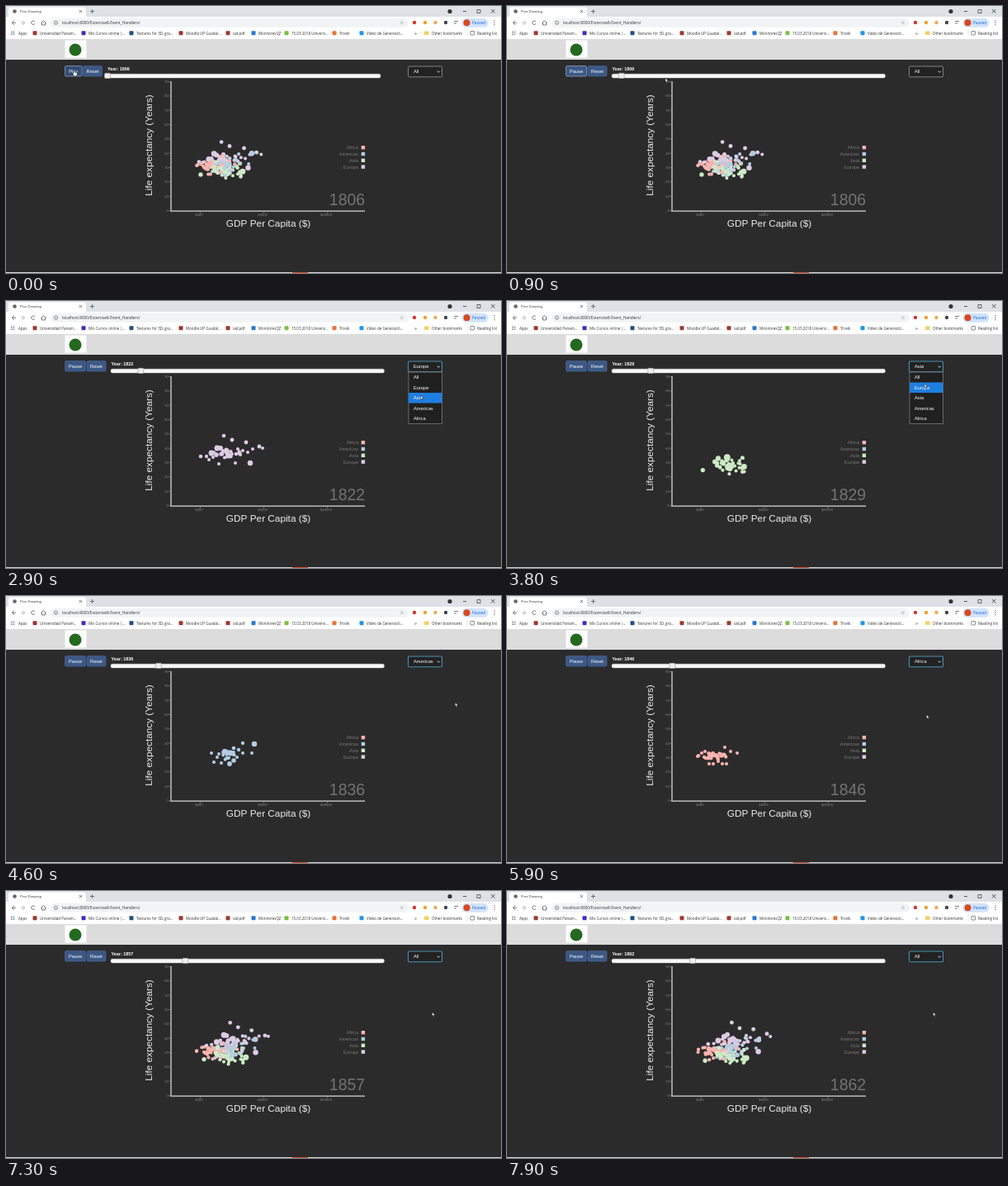
Write an HTML page with a canvas that moves like this. It is 600 by 323 pixels and loops after 8000 ms.

```html
<!DOCTYPE html>
<html lang="es">
<head>
<meta charset="utf-8">
<title>Pine Drawing</title>
<style>
html, body { margin: 0; width: 100%; height: 100%; overflow: hidden; background: #2b2b2b; }
canvas { display: block; width: 600px; height: 323px; }
</style>
</head>
<body>
<canvas id="stage"></canvas>
<script>
const LOOP = 8000, canvas = document.getElementById('stage'), c = canvas.getContext('2d');
const dpr = window.devicePixelRatio || 1;
canvas.width = 600 * dpr;
canvas.height = 323 * dpr;
c.scale(dpr, dpr);

const SANS = '"Liberation Sans", Arial, sans-serif', UI = '"Open Sans", sans-serif';
const COLORS = { Africa: '#fbb4ae', Americas: '#b3cde3', Asia: '#ccebc5', Europe: '#decbe4' };
const OPTIONS = ['All', 'Europe', 'Asia', 'Americas', 'Africa'];

// [time, year]
const YEARS = [[0, 1806.2], [900, 1806.2], [1800, 1812.5], [2900, 1822.5], [4600, 1836.5],
  [5900, 1846.5], [6700, 1853.5], [7900, 1862.4], [8000, 1862.9]];
// [time, x, y]
const POINTER = [[0, 82, 78], [700, 82, 78], [1500, 519.5, 114.5], [1800, 519.5, 114.5],
  [2050, 510, 80], [2200, 502, 104], [2350, 502, 104], [2650, 505, 80], [2850, 502.5, 114],
  [3050, 502.5, 115], [3400, 540, 125], [3700, 508, 80], [3950, 503, 130], [4100, 503, 130],
  [4450, 544.5, 129], [4600, 544.5, 129], [5000, 510, 80], [5200, 502, 142], [5350, 502, 142],
  [5700, 508.5, 143.5], [5950, 508.5, 143.5], [6150, 508, 80], [6300, 502, 92],
  [6420, 502, 92], [6650, 516.5, 146.5], [8000, 516.5, 146.5]];
// menu opens, menu closes, new choice
const CHOICES = [[2080, 2300, 'Europe'], [2680, 3000, 'Asia'], [3730, 4050, 'Americas'],
  [5020, 5320, 'Africa'], [6160, 6400, 'All']];

function track(keys, t) {
  let i = 0;
  while (i < keys.length - 2 && t >= keys[i + 1][0]) i++;
  const a = keys[i], b = keys[i + 1], k = (t - a[0]) / (b[0] - a[0]);
  return a.slice(1).map((v, j) => v + (b[j + 1] - v) * k);
}

function rand(n) {
  const s = Math.sin(n * 127.1 + 11.7) * 43758.5453;
  return s - Math.floor(s);
}

function wobble(id, year) {
  const n = Math.floor(year), k = year - n, at = m => rand(id * 91 + m) - 0.5;
  return at(n) * (1 - k) + at(n + 1) * k;
}

const spread = (n, range) => (rand(n) + rand(n + 500) + rand(n + 900) - 1.5) * range;

// Positions in a base year, with the drift per year
const GROUPS = {
  Europe: { base: 1822, dx: 0.2, dy: -0.07, at: [[236, 188], [243, 188], [246, 192], [249, 184],
    [251, 189], [252, 183], [255, 186], [256, 178], [258, 197], [260, 178], [262, 185], [264, 163],
    [267, 180], [270, 187], [274, 168], [274, 185], [278, 196], [279, 185], [281, 179], [284, 186],
    [287, 181], [291, 171], [293, 183], [296, 196], [299, 179], [307, 176], [311, 178]] },
  Americas: { base: 1836, dx: 0.12, dy: -0.02, at: [[249, 190], [252, 201], [256, 195], [258, 191],
    [261, 202], [263, 189], [266, 187], [268, 196], [271, 203], [272, 190], [276, 184], [276, 199],
    [280, 195], [282, 186], [287, 190], [287, 178], [298, 190], [301, 179]] },
  Africa: { base: 1846, dx: 0.02, dy: 0, at: [[266, 203], [231, 194], [236, 190], [240, 188],
    [245, 203], [250, 203], [256, 200], [261, 203], [264, 183], [271, 188], [279, 190]] },
  Asia: { base: 1806, dx: 0.06, dy: 0.01, at: [[268, 201], [266, 190], [236, 204]] }
};
// Seeded extras: count, centre x, width, centre y, height
const FILL = { Europe: [12, 269, 14, 184, 5], Americas: [12, 268, 8, 191, 6],
  Africa: [36, 251, 15, 193, 4], Asia: [42, 268, 20, 197, 9] };

const dots = [];
for (const name in GROUPS) {
  const { at } = GROUPS[name], [count, x, sx, y, sy] = FILL[name];
  for (let i = 0; i < count; i++) {
    const n = i + 1 + count * 7;
    at.push([x + spread(n, sx), y + spread(n + 60, sy)]);
  }
  at.forEach(([px, py], i) => {
    const id = dots.length + 1;
    const r = name === 'Asia' && i < 2 ? 5 - i : name === 'Africa' ? 2.1 : 2 + 1.5 * rand(id) ** 4;
    dots.push({ name, id, x: px, y: py, r, odd: name === 'Africa' && i === 0 });
  });
}
dots.sort((a, b) => (b.r > 3.6) - (a.r > 3.6) || rand(a.id + 40) - rand(b.id + 40));

function box(x, y, w, h, fill, radius = 0, stroke, line = 0.7) {
  c.beginPath();
  c.roundRect(x, y, w, h, radius);
  if (fill) { c.fillStyle = fill; c.fill(); }
  if (stroke) { c.strokeStyle = stroke; c.lineWidth = line; c.stroke(); }
}

function disc(x, y, r, fill) {
  c.beginPath();
  c.arc(x, y, r, 0, 7);
  c.fillStyle = fill;
  c.fill();
}

function text(s, x, y, size, fill, align = 'left', font = SANS, weight = '') {
  c.font = `${weight} ${size}px ${font}`;
  c.textAlign = align;
  c.fillStyle = fill;
  c.fillText(s, x, y);
}

function path(points, stroke, width = 0.8) {
  c.beginPath();
  points.forEach(([x, y]) => c.lineTo(x, y));
  c.strokeStyle = stroke;
  c.lineWidth = width;
  c.stroke();
}

function drawBrowser() {
  const ink = '#55585c';
  box(0, 0, 600, 14, '#dee1e6');
  box(3, 1.5, 94, 13, '#fff', [3, 3, 0, 0]);
  box(0, 13, 600, 27, '#fff');
  disc(10.5, 6.5, 2.3, '#666');
  text('Pine Drawing', 17, 8.3, 4.2, '#333', 'left', UI);
  path([[89, 5], [92, 8]], ink); path([[92, 5], [89, 8]], ink);
  path([[102, 6.5], [107, 6.5]], ink); path([[104.5, 4], [104.5, 9]], ink);
  disc(538, 6.5, 2.6, '#333');
  path([[554, 6.5], [558, 6.5]], '#333');
  box(571, 4.5, 4, 4, null, 0, '#333');
  path([[588, 4], [592.5, 8.5]], '#333'); path([[592.5, 4], [588, 8.5]], '#333');

  path([[10, 17.5], [7.3, 20.2], [10, 23]], ink); path([[7.3, 20.2], [12, 20.2]], ink);
  path([[20, 17.5], [22.7, 20.2], [20, 23]], '#aaa'); path([[18, 20.2], [22.7, 20.2]], '#aaa');
  c.beginPath(); c.arc(33, 20.2, 2.3, 0.5, 5.7); c.strokeStyle = ink; c.lineWidth = 0.8; c.stroke();
  path([[42.5, 20.5], [45.5, 17.5], [48.5, 20.5]], ink); path([[43.5, 20], [43.5, 23], [47.5, 23], [47.5, 20]], ink);
  box(54, 14.8, 434, 11, '#f1f3f4', 5.5);
  c.beginPath(); c.arc(60.5, 20.2, 2.2, 0, 7); c.strokeStyle = ink; c.lineWidth = 0.6; c.stroke();
  path([[60.5, 19.7], [60.5, 21.4]], ink, 0.6);
  text('localhost:8000/Excercise8-Event_Handlers/', 68, 22, 4.75, '#333', 'left', UI);
  text('☆', 480, 22.3, 6, ink, 'center', '"DejaVu Sans", sans-serif');
  [[495, '#d9352c'], [508, '#eda12e'], [520.5, '#e6ad55'], [533, '#444']].forEach(([x, fill]) => disc(x, 20, 2.2, fill));
  path([[543, 18.5], [548, 18.5]], ink); path([[543, 21], [546, 21]], ink);
  box(552.5, 14.8, 32, 11, '#d2e3fc', 5.5);
  disc(558.5, 20.2, 4, '#d8491e');
  text('Paused', 565, 22, 4.7, '#1967d2', 'left', UI);
  [17.7, 20.2, 22.7].forEach(y => disc(592, y, 0.65, ink));

  for (let i = 0; i < 9; i++) box(6 + i % 3 * 1.7, 30.5 + Math.floor(i / 3) * 1.7, 1.1, 1.1, ['#d44', '#4a4', '#48d'][i % 3]);
  text('Apps', 15, 34.6, 4.5, '#333', 'left', UI);
  [['Universidad Panam...', 41, '#9b3b2e'], ['Mis Cursos online |...', 100, '#3b2fc4'],
    ['Textures for 3D, gra...', 158, '#24507f'], ['Moodle UP Guadal...', 218, '#9b3b2e'],
    ['iad.pdf', 275, '#9b3b2e'], ['MonitoresQZ', 306, '#2a78d0'],
    ['15.03.2018 Universi...', 346, '#7ac143'], ['Trovik', 404, '#e8743b'],
    ['Video de Generació...', 437, '#2196e8']].forEach(([label, x, fill]) => {
    box(x - 8.5, 30.2, 5, 5, fill, 1);
    text(label, x, 34.6, 4.5, '#333', 'left', UI);
  });
  text('»', 495, 34.8, 6, '#333', 'left', UI);
  box(507, 30.5, 5.5, 4.5, '#f6cf63', 0.7);
  text('Other bookmarks', 516, 34.6, 4.5, '#333', 'left', UI);
  path([[559, 28.5], [559, 37]], '#ccc', 0.5);
  box(563, 30.5, 4.5, 4.5, null, 0.5, ink);
  text('Reading list', 571, 34.6, 4.5, '#333', 'left', UI);

  box(0, 40, 600, 25, '#dcdcdc');
  box(71.5, 41.5, 26, 21, '#fff');
  disc(84, 53, 7.5, '#24691f');
  box(0, 322, 600, 1, '#d5dbe0');
  box(347, 322, 19, 1, '#d8502a');
}

function drawControls(t, year) {
  const playing = t >= 700, shift = playing ? 4.5 : 0, left = playing ? 127 : 119.5;
  const blue = '#3c5885', first = playing ? 25 : 20.5;
  box(71.5, 72.5, first, 12.5, playing ? blue : '#324d78', 1.5, t < 2300 ? '#9aabc6' : '#4a6592');
  text(playing ? 'Pause' : 'Play', 71.5 + first / 2, 80.6, 5.7, '#fff', 'center');
  box(93.5 + shift, 72.5, 23, 12.5, blue, 1.5, '#4a6592');
  text('Reset', 105 + shift, 80.6, 5.7, '#fff', 'center');
  text('Year: ' + year, 123 + shift, 78.2, 5.4, '#fff', 'left', SANS, 'bold');
  box(left, 82.2, playing ? 331.5 : 334.5, 4.8, '#f7f7f7', 2, '#ccc', 0.4);
  const thumb = playing ? 129.5 + (year - 1800) * 1.54 : 123;
  box(thumb - 3.4, 81.3, 6.8, 6.2, '#efefef', 1, '#999', 0.6);
}

function drawAxes(year) {
  const line = '#a6a6a6';
  path([[200, 91], [200, 248.2], [435, 248.2]], line, 1.8);
  for (let v = 0; v <= 90; v += 10) {
    const y = 247.6 - v * 1.735;
    path([[197.5, y], [200, y]], line, 0.6);
    text(v, 196.8, y + 1.4, 4.2, '#858585', 'right');
  }
  ['$400', '$4000', '$40000'].forEach((s, i) => {
    const x = 235.5 + 77 * i;
    path([[x, 248], [x, 250.5]], line, 0.6);
    text(s, x - 1.5, 254.3, 4.2, '#858585', 'center');
  });
  text('GDP Per Capita ($)', 318, 267, 11.8, '#eee', 'center');
  c.save();
  c.translate(177, 168.5);
  c.rotate(-Math.PI / 2);
  text('Life expectancy (Years)', 0, 0, 11.75, '#eee', 'center');
  c.restore();
  text(year, 435, 241.3, 19.4, '#737373', 'right');
  Object.keys(COLORS).forEach((name, i) => {
    const y = 171.2 + i * 7.8;
    text(name, 427, y + 2, 5.6, '#787878', 'right');
    box(430.7, y - 2.2, 4.4, 4.4, COLORS[name]);
  });
}

function drawDots(year, choice) {
  for (const d of dots) {
    if (choice !== 'All' && choice !== d.name) continue;
    const g = GROUPS[d.name], age = year - g.base - 0.5, sway = 3.5 * Math.min(1, Math.abs(age) / 6);
    // one short-lived collapse of life expectancy
    const drop = d.odd ? 31 * Math.max(0, 1 - Math.abs(year - 1853.5) / 1.5) : 0;
    disc(d.x + g.dx * age + sway * wobble(d.id, year / 3),
      d.y + g.dy * age + sway * wobble(d.id + 400, year / 2) + drop, d.r, COLORS[d.name]);
  }
}

function drawSelect(t, choice, y) {
  const open = CHOICES.some(([a, b]) => t >= a && t < b);
  const focused = t >= 2080;
  box(487.5, 73, 41, 12.8, '#222', 1.2, focused ? '#4a90b8' : '#aaa', focused ? 1.1 : 0.7);
  text(choice, 494, 81.4, 5.7, '#fff');
  path([[522.7, 78.7], [524.3, 80.3], [525.9, 78.7]], '#fff');
  if (!open) return;
  const hover = y < 86 ? OPTIONS.indexOf(choice) : Math.min(4, Math.floor((y - 86) / 12.5));
  box(488, 86, 40.5, 62.5, '#202020', 0, '#999', 0.6);
  box(488, 86 + hover * 12.5, 40.5, 12.5, '#1e7fe0');
  OPTIONS.forEach((name, i) => text(name, 494, 94 + i * 12.5, 5.7, '#fff'));
}

function drawPointer(x, y, hand) {
  c.save();
  c.translate(x, y);
  c.fillStyle = '#fff';
  c.strokeStyle = '#111';
  c.lineWidth = 0.5;
  const shape = hand ? 'M0 0q1-1 1.4 0v2l2.8.7v2.3l-1 1.8h-2.6l-2-2.7q.2-1 1.4 0z' : 'M0 0v4.7l1.1-1 .8 1.8.9-.4-.8-1.7h1.5z';
  const p = new Path2D(shape);
  c.fill(p);
  c.stroke(p);
  c.restore();
}

function draw(t) {
  const [value] = track(YEARS, t), year = Math.floor(value), [x, y] = track(POINTER, t);
  const choice = CHOICES.reduce((now, [, end, name]) => t >= end ? name : now, 'All');
  box(0, 0, 600, 323, '#2b2b2b');
  drawBrowser();
  drawControls(t, year);
  drawAxes(year);
  drawDots(value, choice);
  drawSelect(t, choice, y);
  drawPointer(x, y, t < 700);
}

const start = performance.now();
function tick() {
  draw((performance.now() - start) % LOOP);
  requestAnimationFrame(tick);
}
tick();
</script>
</body>
</html>
```
